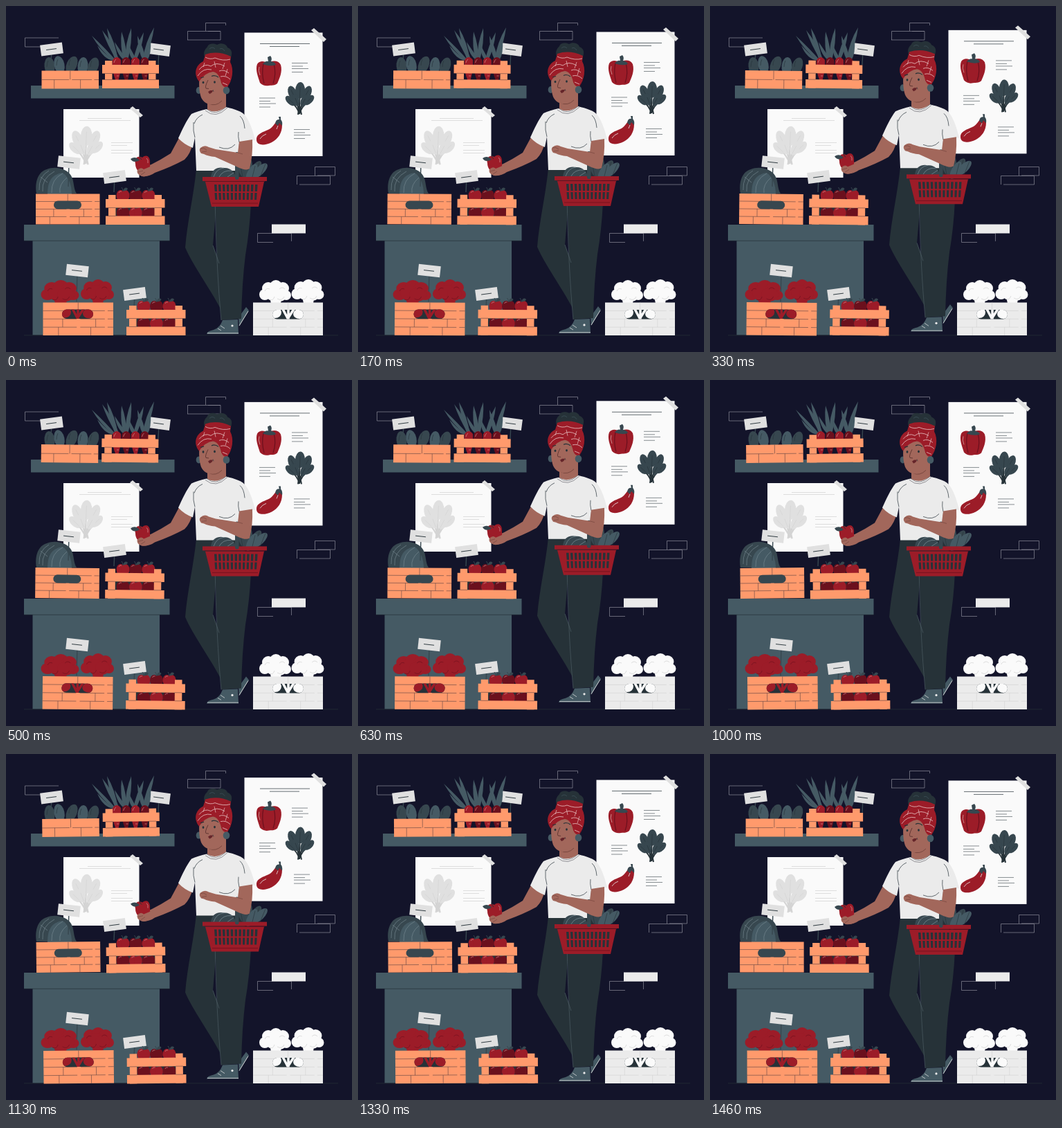
Recreate the animation shown at these times as an HTML page with a canvas. Size 500x500 px, loop 1.5 s.

```html
<!DOCTYPE html>
<html lang="en">
<head>
<meta charset="utf-8">
<title>Vegetable stall</title>
<style>
html, body { margin: 0; width: 100%; height: 100%; overflow: hidden; background: #13142a; }
canvas { display: block; width: 100vw; height: 100vh; }
</style>
</head>
<body>
<canvas id="stage" width="500" height="500"></canvas>
<script>
const ctx = document.getElementById('stage').getContext('2d');
const LOOP = 1500, STEPS = 36;
const NIGHT = '#13142a', TEAL = '#455a64', SLATE = '#37474f', DARK = '#263238';
const RED = '#9c1c28', WINE = '#6b101d', SKIN = '#a2675b', ORANGE = '#ff9a6c';
const WHITE = '#fafafa', PALE = '#ebebeb', GREY = '#e0e0e0';

function fill(path, color) {
  ctx.fillStyle = color;
  ctx.fill(new Path2D(path));
}
function line(path, color = DARK, width = 0.8) {
  ctx.strokeStyle = color;
  ctx.lineWidth = width;
  ctx.stroke(new Path2D(path));
}
function rect(x, y, w, h, color) {
  ctx.fillStyle = color;
  ctx.fillRect(x, y, w, h);
}
function oval(x, y, rx, ry, color, turn = 0) {
  ctx.fillStyle = color;
  ctx.beginPath();
  ctx.ellipse(x, y, rx, ry, turn, 0, 7);
  ctx.fill();
}
function pill(x, y, w, h, color) {
  ctx.fillStyle = color;
  ctx.beginPath();
  ctx.roundRect(x, y, w, h, Math.min(w, h) / 2);
  ctx.fill();
}
function placed(x, y, scale, draw) {
  ctx.save();
  ctx.translate(x, y);
  ctx.scale(scale, scale);
  draw();
  ctx.restore();
}
// Gentle rocking of a crate around its middle.
function swayed(x, y, w, h, sway, draw) {
  ctx.save();
  ctx.translate(x + w / 2 - 0.8 * sway, y + h / 2);
  ctx.rotate(0.011 * sway);
  ctx.translate(-w / 2, -h / 2);
  draw(w, h);
  ctx.restore();
}

function label(x, y, lean, stick) {
  line(`M${x} ${y}l-1 ${stick}`, SLATE, 1.4);
  ctx.save();
  ctx.translate(x, y);
  ctx.rotate(lean);
  rect(-16, -8, 32, 16, GREY);
  line('M-8 0h15', DARK, 0.9);
  ctx.restore();
}

function plankCrate(x, y, w, h, rows, sway, color = ORANGE, ink = '#5b4344') {
  swayed(x, y, w, h, sway, () => {
    rect(0, 0, w, h, color);
    const step = h / rows;
    for (let i = 0; i < rows; i++) {
      const top = i * step;
      if (i) line(`M0 ${top}H${w * 0.48}M${w * 0.53} ${top}H${w * 0.88}M${w * 0.92} ${top}H${w}`, ink, 0.6);
      const seams = i % 2 ? [0.22, 0.68] : i ? [0.28, 0.75] : [0.5];
      if (rows === 2 || i !== 1) for (const s of seams) line(`M${w * s} ${top}v${step}`, ink, 0.6);
    }
  });
}

function slatCrate(x, y, w, h, sway, contents) {
  contents();
  swayed(x, y, w, h, sway, () => {
    rect(4, 0, 10.5, h, ORANGE);
    rect(w - 15, 0, 10.5, h, ORANGE);
    rect(0, 6, w, 12.5, ORANGE);
    rect(0, h - 12.5, w, 12.5, ORANGE);
    line(`M4 18.5h10.5M${w - 15} 18.5h10.5M4 ${h - 12.5}h10.5M${w - 15} ${h - 12.5}h10.5`, '#5b4344', 0.6);
  });
}

function crateApple(x, y, color) {
  oval(x - 3.5, y, 6, 8, color);
  oval(x + 3.5, y, 6, 8, color);
  line(`M${x} ${y - 6}q0 -4 -2 -6`, SLATE, 1);
  fill(`M${x} ${y - 7}q3 -7 7 -3q-2 4 -7 3`, SLATE);
  line(`M${x - 6} ${y - 4}q1 -3 4 -2`, '#d9a0a0', 0.6);
}
function appleCrate(x, y, sway) {
  slatCrate(x, y, 85.5, 43, sway, () => {
    rect(x + 10, y + 10, 66, 26, DARK);
    for (let i = 0; i < 3; i++) {
      crateApple(x + 25 + i * 18.5, y + 26, i === 1 ? RED : WINE);
      crateApple(x + 25 + i * 18.5, y + 1, i === 1 ? WINE : RED);
    }
  });
}

function broccoli(x, y, w, color, ink) {
  const u = w / 46;
  fill(`M${x - 9 * u} ${y + 4}L${x - 3} ${y + 32}h9L${x + 10 * u} ${y + 4}Z`, color);
  for (const [dx, dy, r] of [[-15, 5, 8], [-10, -4, 9], [1, -7, 9], [11, -4, 9], [16, 6, 7], [-3, 3, 11], [7, 5, 10]])
    oval(x + dx * u, y + dy, r * u, r, color);
  line(`M${x - 9 * u} ${y + 12}q6 3 8 -4M${x + 3 * u} ${y + 11}q7 4 10 -3M${x - 15 * u} ${y}q2 -5 7 -3M${x + 6 * u} ${y - 3}q4 -4 8 0`, ink, 0.6);
}
function crateHandle(x, y, stalk) {
  pill(x, y, 45, 13.5, DARK);
  ctx.save();
  ctx.beginPath();
  ctx.roundRect(x, y, 45, 13.5, 6.7);
  ctx.clip();
  oval(x + 4, y + 4, 9, 8, stalk);
  oval(x + 39, y + 6, 9, 7, stalk);
  line(`M${x + 15} ${y - 1}l8 15M${x + 31} ${y - 1}l-9 14M${x + 23} ${y - 1}v15`, stalk, 3.5);
  ctx.restore();
}

function spinach(x, y, scale, leaf, stem) {
  placed(x, y, scale, () => {
    const leaves = [[-13, -19, 5, 9, -0.8], [14, -20, 5, 9, 0.8], [-10, -30, 6, 11, -0.35], [11, -30, 6, 11, 0.4], [1, -34, 7, 12, 0.05], [-5, -20, 5, 9, -0.3], [7, -19, 5, 9, 0.4]];
    for (const [lx, ly, rx, ry, turn] of leaves) {
      line(`M0 0Q${lx * 0.2} ${ly * 0.5} ${lx} ${ly}`, stem, 1.8);
      oval(lx, ly, rx, ry, leaf, turn);
      line(`M${lx * 0.45} ${ly * 0.65}L${lx * 1.2} ${ly * 1.15}`, stem, 0.6);
    }
    line('M-2 1L0 -13L3 1', stem, 2);
  });
}

function textLines(x, y) {
  line(`M${x} ${y}h23M${x} ${y + 4.5}h16M${x} ${y + 8}h24M${x} ${y + 13}h16`, '#555d63', 0.7);
}

function bricks() {
  const ink = '#8b8c98';
  line('M76 46H27.5V59H52M262.5 49V36.5H310V49H262M288.5 36V24.5H317.5V28M292 36.5H310', ink, 0.7);
  line('M446.5 245V232.5H475.5V245H450M420.5 258V245.5H468.5V258H424', ink, 0.7);
  line('M386 341.5H363.5V328.5H412.5V340', ink, 0.7);
  rect(384, 315.5, 49, 13, PALE);
}

function smallPoster() {
  rect(83, 149, 109.5, 99, WHITE);
  line('M118 162.5H167M106 165.5H180M152 197.5H183M152 201.5H175M152 208.5H183M152 212.5H183', '#d2d2d2', 0.7);
  spinach(115, 228, 1.18, GREY, '#d4d4d4');
  fill('M179 148L183 145L198 158L194 161Z', GREY);
}

function bigPoster() {
  rect(344.5, 38.5, 113, 178.5, WHITE);
  fill('M441 35L445 32L463 48L459 52Z', GREY);
  line('M367 54.5H439M381 58.5H424', DARK, 0.7);
  textLines(413, 82.5);
  textLines(366, 133);
  textLines(416, 178.5);
  fill('M363 84C367 78 373 80 379 82C386 78 394 79 397 85C400 95 395 105 392 112C387 116 384 114 380 115C375 116 371 115 367 111C364 102 360 92 363 84Z', RED);
  line('M372 83Q369 98 373 112M387 83Q391 98 386 112', WINE, 1.2);
  fill('M371 84Q375 79 379 80L378 74L382 72Q385 75 383 80Q389 81 390 85Q382 88 371 84Z', SLATE);
  line('M366 88Q364 93 367 100', '#d9a0a0', 0.8);
  spinach(424, 156, 1, SLATE, DARK);
  fill('M390 168C393 164 399 166 399 172C399 184 393 192 384 197C374 202 363 202 362 194C361 186 369 183 376 180C383 178 386 173 390 168Z', RED);
  fill('M389 170Q390 163 395 164L394 160L397 160L397 164Q400 167 399 173L395 169L393 173Z', SLATE);
  line('M367 192Q370 187 376 185M391 178L393 173', PALE, 0.8);
}

function upperShelf(sway) {
  rect(36, 115, 207.5, 18.5, TEAL);
  label(66, 62.5, -0.13, 20);
  [[63, 84, -0.1], [77, 82, -0.2], [95, 82, 0.4], [111, 84, 0.1], [126, 84, 0.35]].forEach(([x, y, turn], i) => {
    oval(x, y + 3, 7.5, 13, i % 2 ? TEAL : SLATE, turn);
    line(`M${x - 2} ${y - 5}q-2 4 -2 9`, DARK, 0.6);
  });
  plankCrate(51.5, 93.5, 82.5, 26, 2, sway);

  label(221, 63, 0.13, 22);
  slatCrate(139, 79, 82, 40, sway, () => {
    rect(150, 88, 60, 22, NIGHT);
    for (const [root, tip, top] of [[157, 124, 43], [158, 132, 57], [160, 146, 32], [162, 139, 35], [172, 167, 37], [174, 181, 32], [174, 157, 52], [186, 199, 38], [188, 177, 56], [199, 214, 31], [202, 209, 49], [200, 190, 43]])
      fill(`M${root - 2} 79Q${(root + tip) / 2 - 5} ${top + 20} ${tip} ${top}Q${(root + tip) / 2 + 5} ${top + 20} ${root + 2} 79Z`, TEAL);
    for (let i = 0; i < 4; i++) {
      const x = 160 + i * 13.5;
      fill(`M${x - 6} 78Q${x} 70 ${x + 6} 78Q${x + 7} 92 ${x + 2} 109L${x - 1} 109Q${x - 8} 92 ${x - 6} 78Z`, i % 2 ? WINE : RED);
      line(`M${x - 4} 82q1 -4 3 -5M${x} 101l3 0`, '#d98d8d', 0.7);
    }
  });
}

function counter(sway) {
  rect(38.5, 339, 183.5, 136.5, TEAL);
  rect(26, 316, 210.5, 23, TEAL);
  line('M26 339.3H236.5', DARK, 0.7);
  fill('M44 271C41 254 47 239 59 236C71 231 88 235 94 245C99 253 97 264 102 271Z', SLATE);
  fill('M60 272C60 252 67 243 82 241C91 247 95 260 95 272Z', TEAL);
  line('M48 266Q47 246 62 238M53 268Q51 249 70 239M66 270Q65 250 82 242M78 270Q76 258 88 248M60 255L50 247', '#7b8e95', 0.6);
  label(91, 226, 0.11, 35);
  plankCrate(43, 271.5, 92.5, 44, 4, sway);
  swayed(69, 281.5, 40, 12, sway, (w, h) => pill(0, 0, w, h, SLATE));
  label(157, 247, -0.13, 22);
  appleCrate(144, 273, sway);
}

function floorCrates(sway) {
  line('M26 475.8H480', DARK, 0.7);
  label(103, 382.5, 0.11, 45);
  broccoli(78, 412, 55, RED, WINE);
  broccoli(132, 411, 48, RED, WINE);
  plankCrate(53.5, 428.5, 101.5, 47.5, 4, sway);
  swayed(81, 438.5, 45, 13.5, sway, () => crateHandle(0, 0, RED));
  label(186, 416, -0.13, 22);
  appleCrate(174, 433, sway);

  broccoli(389, 412, 46, WHITE, '#c9c9c9');
  broccoli(436, 411, 47, WHITE, '#c9c9c9');
  plankCrate(357, 428.5, 101, 47.5, 4, 0, PALE, '#d0d0d0');
  crateHandle(385, 439, WHITE);
}

function legs() {
  fill('M336 450L347 435L351 440L337 463Z', TEAL);
  line('M350 441L337 462', GREY, 0.9);
  fill('M275 236C271 275 262 312 259 349C270 375 293 405 312 441L320 400L299 346L304 288L330 236Z', DARK);
  fill('M300 236L303 300Q305 380 311 454L340 452Q341 400 346 360Q352 325 354 285L340 236Z', DARK);
  line('M302 275Q304 380 311 454M308 372L299 346', '#53636a', 0.6);
  fill('M313 454L335 453L336 474H290Q290 470 300 468Q309 465 313 454Z', TEAL);
  line('M291 472.8H336', GREY, 0.8);
  line('M310 462l6 4M306 466l5 3', PALE, 0.7);
  oval(327, 462, 1.6, 1.6, PALE);
}

function torso() {
  fill('M252 187L270 198Q267 213 258 222Q240 232 215 241Q207 247 197 246Q188 243 190 236Q202 232 210 229Q224 222 238 213Z', SKIN);
  fill('M291 128L318 126V154Q303 164 291 153Z', SKIN);
  line('M293 141Q303 146 312 137', '#6f4039', 0.8);
  fill('M290 149Q303 157 318 146C330 149 342 152 347 160C353 169 357 181 360 194L337 198L335 238H275L273 190L270 205Q257 200 249 191C255 178 261 165 268 156Q277 152 290 149Z', PALE);
  line('M290 149Q303 160 318 146M288 151Q303 164 320 147', '#52525c', 0.6);
  line('M273 190Q270 181 271 168M308 204Q322 210 331 200M338 159Q344 164 345 177M337 197Q335 188 336 182M284 157Q275 161 272 170', DARK, 0.7);
}

function heldApple() {
  fill('M197 219C190 215 185 221 187 228C187 236 192 242 198 239C205 241 209 235 208 228C209 219 204 213 197 219Z', RED);
  fill('M193 223Q184 228 180 221Q187 216 193 223Z', SLATE);
  line('M196 222Q193 220 193 216', DARK, 1);
  line('M203 220Q206 222 205 227', '#d9a0a0', 0.7);
  fill('M190 237Q195 232 199 236L211 231L214 240Q203 248 196 246Q188 243 190 237Z', SKIN);
  line('M191 240L198 238M195 244L201 240', '#6f4039', 0.6);
}

function basket() {
  for (const [x, y, turn] of [[342, 237, -0.4], [350, 234, 0.1], [360, 236, 0.6], [367, 238, 0.8], [355, 241, 0.5]]) {
    oval(x, y, 6, 14, x % 2 ? TEAL : SLATE, turn);
    line(`M${x} ${y + 10}L${x + 10 * turn} ${y - 10}`, DARK, 0.6);
  }
  fill('M296 248C297 235 307 232 315 234C324 233 331 240 332 248Z', SLATE);
  line('M300 247Q304 235 315 234M308 247Q313 237 326 238M320 247L329 241', '#7b8e95', 0.7);
  fill('M288 254H373L365 290H297Z', RED);
  ctx.fillStyle = DARK;
  for (let i = 0; i < 11; i++) {
    const x = 301 + i * 5.9, lean = (330 - x) / 55;
    fill(`M${x} 258h3.5l${lean} 10h-3.3ZM${x + lean} 270h3.2l${lean} 10h-3Z`, DARK);
  }
  rect(284, 247, 93, 6, RED);
  line('M287 253.5H374M298 285H364', WINE, 0.8);
  pill(331, 211, 5.5, 40, SLATE);
}

function bentArm() {
  fill('M337 196L356 193Q357 216 352 235Q347 239 333 232L302 218Q292 217 286 214L282 213Q278 208 281 205Q287 200 293 204L303 207L335 212Z', SKIN);
  line('M281 206Q286 204 290 208M283 211L290 210M335 212L342 214', '#6f4039', 0.6);
}

function head() {
  fill('M288 76C283 65 290 61 291 59C293 53 302 54 305 56C312 52 319 56 320 60C328 63 327 70 324 77Q306 87 288 76Z', DARK);
  line('M294 62q4 -4 8 0M309 62q4 -2 7 3', TEAL, 0.6);
  oval(278.5, 122, 3.8, 5, TEAL);
  fill('M281 96C278 108 279 121 281 129C283 138 291 143 299 142C308 141 315 132 320 119L322 98L304 84Z', SKIN);
  fill('M279 109C271 99 273 86 285 80L288 70Q306 64 325 73L324 81C330 92 327 108 320 117Q314 119 311 111C309 101 305 96 299 95Q288 96 279 109Z', RED);
  line('M288 74Q295 78 302 75Q314 80 324 77M279 92Q287 82 296 87Q304 80 316 87M277 101Q285 89 297 92M308 94Q315 91 322 97M310 102Q318 100 324 106M313 111L320 114', '#e8c5c5', 0.8);
  line('M287 82L285 88M301 80L303 89M316 82L313 91M320 91L317 101', '#e8c5c5', 0.7);
  oval(318.5, 122, 4.8, 5.4, TEAL);
  line('M281 104L286 102.5M297 101.5Q302 99 307 103', DARK, 1.2);
  oval(285, 110.5, 1.4, 1.8, DARK);
  oval(301.5, 110, 1.4, 1.8, DARK);
  line('M292 107Q287 117 289 119L293 119.5', '#532d2a', 0.8);
  fill('M292 124L295 122L299 122Q298 126 294 127Z', '#65252a');
  line('M299 121L300 124', DARK, 0.6);
}

function shopper() {
  legs();
  torso();
  heldApple();
  basket();
  bentArm();
  head();
}

function render(now) {
  const step = Math.floor((now % LOOP + 5) / LOOP * STEPS) % STEPS;
  const phase = step / STEPS * Math.PI * 2;
  const sway = Math.sin(phase);
  const lift = -4.4 * (1 - Math.cos(phase));

  rect(0, 0, 500, 500, NIGHT);
  bricks();
  smallPoster();
  upperShelf(sway);
  counter(sway);
  floorCrates(sway);
  ctx.save();
  ctx.translate(0, lift);
  bigPoster();
  shopper();
  ctx.restore();
}

const start = performance.now();
function tick() {
  render(performance.now() - start);
  requestAnimationFrame(tick);
}
tick();
</script>
</body>
</html>
```
